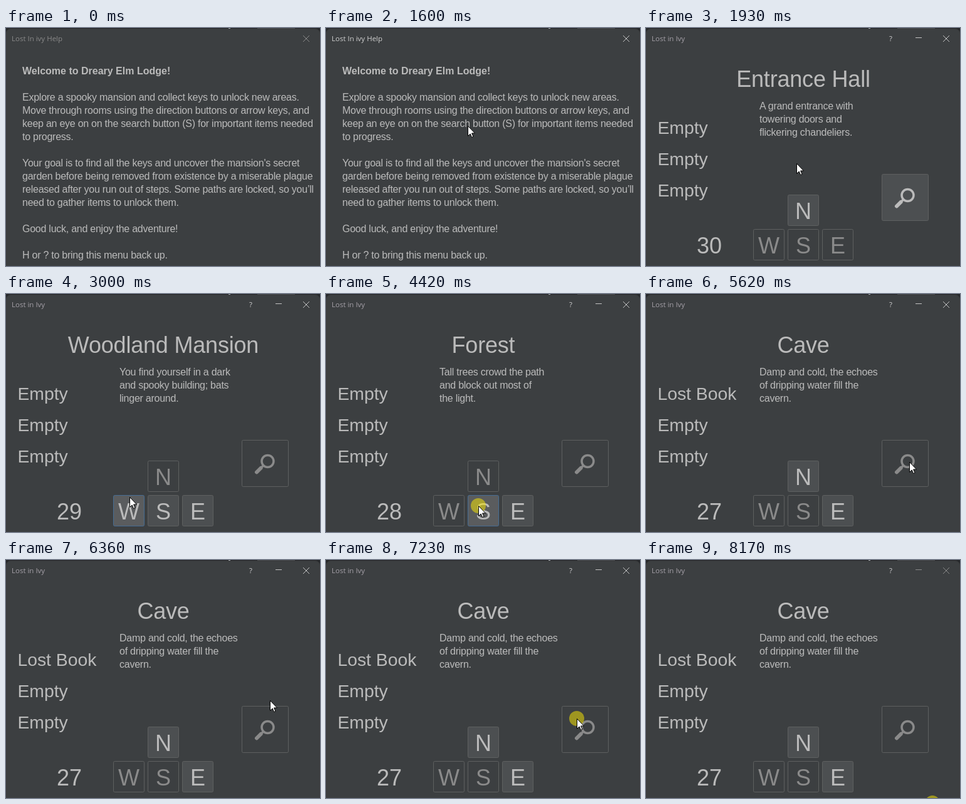
Write an HTML page that moves like this. It is 501 by 380 pixels and loops after 8.24 s.

```html
<!DOCTYPE html>
<html lang="en">
<head>
<meta charset="utf-8">
<title>Mansion game</title>
<style>
  html, body { margin: 0; width: 100%; height: 100%; overflow: hidden; background: #3c3f41; }
  svg { display: block; }
  text { font-family: "Liberation Sans", Arial, sans-serif; fill: #bbb; white-space: pre; }
  .bar { font: 11.5px "Open Sans", "Noto Sans", sans-serif; }
  .body { font-size: 16px; letter-spacing: -.25px; }
  .heading { font-size: 16px; font-weight: bold; }
  .big { font-size: 36px; }
  .room { letter-spacing: -.2px; }
  .mid { text-anchor: middle; }
  .item { font-size: 28.3px; }
</style>
</head>
<body>
<svg id="stage" width="501" height="380" viewBox="0 0 501 380"></svg>
<script>
const LOOP = 8240, HELP_FOCUS = 1470, HELP_CLOSES = 1870, FOCUS_LOST = 8170;
const LINE = 21, HOLD = 130, KEY = 50, GAP = 55, FIRST_STEPS = 30;
const INK = '#bbb', DIM = '#8a8a8a', BRIGHT = '#c4c4c4';
const stage = document.getElementById('stage');

const help = `Welcome to Dreary Elm Lodge!

Explore a spooky mansion and collect keys to unlock new areas.
Move through rooms using the direction buttons or arrow keys, and
keep an eye on on the search button (S) for important items needed
to progress.

Your goal is to find all the keys and uncover the mansion's secret
garden before being removed from existence by a miserable plague
released after you run out of steps. Some paths are locked, so you’ll
need to gather items to unlock them.

Good luck, and enjoy the adventure!

H or ? to bring this menu back up.`.split('\n');

// "open" lists the enabled buttons; "?" stands for search
const rooms = [
  { name: 'Entrance Hall', open: 'N?',
    about: ['A grand entrance with', 'towering doors and', 'flickering chandeliers.'] },
  { name: 'Woodland Mansion', open: 'WSE',
    about: ['You find yourself in a dark', 'and spooky building; bats', 'linger around.'] },
  { name: 'Forest', open: 'SE',
    about: ['Tall trees crowd the path', 'and block out most of', 'the light.'] },
  { name: 'Cave', open: 'NE?',
    about: ['Damp and cold, the echoes', 'of dripping water fill the', 'cavern.'] }
];

const buttons = [
  ...[...'WSE'].map((key, i) => ({ key, x: 171 + i * GAP, y: 321, size: KEY })),
  { key: 'N', x: 171 + GAP, y: 321 - GAP, size: KEY },
  { key: '?', x: 376, y: 233, size: 75 }
];

// The cursor eases to each spot in turn and may click there
const offstage = { x: 457, y: 388 };
const moves = [
  { start: 130, time: 460, x: 417, y: 384 },
  { start: 1000, time: 540, x: 226, y: 156 },
  { start: 1800, time: 280, x: 258, y: 288, clicks: [2400] },
  { start: 2530, time: 420, x: 197, y: 324, clicks: [3080] },
  { start: 3150, time: 590, x: 243, y: 338, clicks: [4420] },
  { start: 4550, time: 600, x: 420, y: 280, clicks: [5290] },
  { start: 5420, time: 670, x: 421, y: 224 },
  { start: 6500, time: 470, x: 400, y: 253, clicks: [7030, 7230] },
  { start: 7370, time: 600, ...offstage, clicks: [FOCUS_LOST] }
];
const clicks = moves.flatMap(move => move.clicks ?? []);

const text = (x, y, cls, content, fill = INK) =>
  `<text x="${x}" y="${y}" class="${cls}" style="fill:${fill}">${content}</text>`;
const lines = (x, y, list) =>
  list.map((line, i) => text(x, y + i * LINE, 'body', line)).join('');
const rect = (x, y, w, h, fill) =>
  `<rect x="${x}" y="${y}" width="${w}" height="${h}" fill="${fill}"/>`;

function cursorAt(t) {
  let { x, y } = offstage;
  for (const move of moves) {
    const k = Math.min(1, Math.max(0, (t - move.start) / move.time));
    const ease = k * k * (3 - 2 * k);
    x += (move.x - x) * ease;
    y += (move.y - y) * ease;
  }
  return { x: Math.round(x), y: Math.round(y) };
}

function frame() {
  return rect(0, 0, 501, 380, '#25272a') +
    rect(355, 0, 3, 2, '#a9adb0') + rect(401, 0, 60, 1, '#4b4d50') +
    '<path d="M.5 380V9Q.5 1.5 8 1.5H493Q500.5 1.5 500.5 9V380" fill="#3c3f41" stroke="#38393b"/>';
}

const closeIcon = color =>
  `<path d="M474 12l10 10m0-10l-10 10" fill="none" stroke="${color}"/>`;

function helpWindow(t) {
  const active = t >= HELP_FOCUS;
  return text(9, 21, 'bar', 'Lost In ivy Help', active ? '#d0d0d0' : DIM) +
    closeIcon(active ? BRIGHT : DIM) +
    text(26, 74, 'heading', help[0]) + lines(26, 74 + LINE, help.slice(1));
}

function magnifier(color) {
  return `<g fill="none" stroke="${color}" stroke-linecap="round">
    <circle cx="417.5" cy="267" r="9.5" stroke-width="3.5"/>
    <path d="M410 274.5l-4 4" stroke-width="3.5"/>
    <path d="M406.5 278l-6.5 6.5" stroke-width="6"/></g>`;
}

function button({ key, x, y, size }, enabled, cursor) {
  const hover = enabled && cursor.x >= x && cursor.x < x + size &&
    cursor.y >= y && cursor.y < y + size;
  const fill = !enabled ? 'none' : hover ? '#5a5c5e' : '#4c4f51';
  const ink = enabled ? INK : DIM;
  return `<rect x="${x + .5}" y="${y + .5}" width="${size - 1}" height="${size - 1}" rx="2"
    fill="${fill}" stroke="${hover ? '#466d94' : '#5e6060'}"/>` +
    (key === '?' ? magnifier(ink) : text(x + size / 2, y + 39, 'big mid', key, ink));
}

function gameWindow(t, cursor) {
  // Each of the first clicks enters the next room; the one after that finds the book
  const done = clicks.filter(click => t >= click + HOLD).length;
  const index = Math.min(done, rooms.length - 1), room = rooms[index];
  const found = done >= rooms.length;
  const control = t < FOCUS_LOST ? BRIGHT : DIM;
  const isOpen = key => room.open.includes(key) && !(key === '?' && found);
  const items = [found ? 'Lost Book' : 'Empty', 'Empty', 'Empty'];
  return text(9, 21, 'bar', 'Lost in Ivy', '#a5a0a8') +
    text(390.5, 20.5, 'bar mid', '?', '#d0d0d0') +
    rect(430, 15, 10, 1, control) + closeIcon(control) +
    text(251, 94, 'big mid room', room.name) + lines(181, 130, room.about) +
    items.map((item, i) => text(18.5, 169 + i * 50, 'item', item)).join('') +
    text(81, 360, 'big', FIRST_STEPS - index) +
    buttons.map(b => button(b, isOpen(b.key), cursor)).join('');
}

function pointer({ x, y }, pressed) {
  return (pressed ? `<circle cx="${x}" cy="${y}" r="12" fill="#fe0" opacity=".5"/>` : '') +
    `<path transform="translate(${x} ${y})" fill="#fff" stroke="#000"
      d="M.5 .5v16l3.700-3.500 2.400 5.500 2.400-1-2.400-5.500h4.900z"/>`;
}

let shown = '';
function draw() {
  const t = performance.now() % LOOP;
  const cursor = cursorAt(t);
  const pressed = clicks.some(click => t >= click && t < click + HOLD);
  const markup = frame() +
    (t < HELP_CLOSES ? helpWindow(t) : gameWindow(t, cursor)) + pointer(cursor, pressed);
  if (markup !== shown) stage.innerHTML = shown = markup;
  requestAnimationFrame(draw);
}
draw();
</script>
</body>
</html>
```
